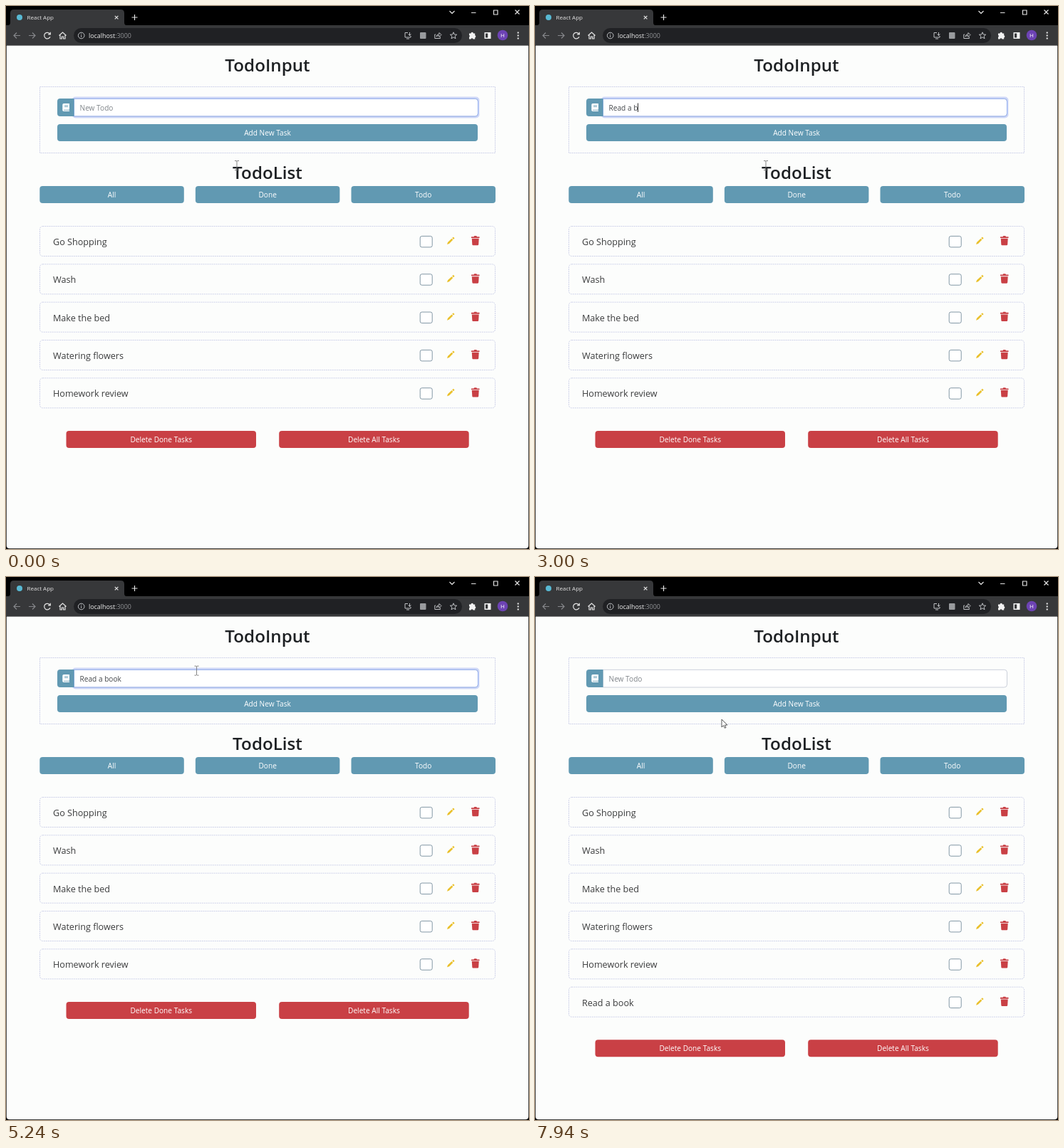
An HTML page that plays this animation: 734x763 px, repeating every 7.96 s.

```html
<!DOCTYPE html>
<html lang="en">
<head>
<meta charset="utf-8">
<title>Todo list</title>
<style>
html, body { margin: 0; width: 100%; height: 100%; overflow: hidden; background: #000; }
svg { display: block; width: 734px; height: 763px; font: 10.15px "Open Sans", "Noto Sans", sans-serif; }
text { white-space: pre; }
.mid { text-anchor: middle; }
.btn { fill: #fff; }
h1, .title { font-size: 24.2px; font-weight: 600; fill: #1d2023; }
.task { font-size: 12.6px; fill: #3b3c3d; }
.box { fill: none; stroke: #cdd1e9; stroke-dasharray: 2 1; }
.line { fill: none; stroke: #e4e4e4; stroke-width: 1.2; }
.dim { stroke: #85868a; }
.soft { stroke: #bfc1c4; stroke-width: 1; }
</style>
</head>
<body>
<svg viewBox="0 0 734 763">
  <rect width="734" height="763" fill="#000"/>
  <path d="M0 27H734V55H0Z" fill="#37383a"/>
  <path d="M3 27Q6 27 6 23V10Q6 5 11 5H161Q166 5 166 10V23Q166 27 169 27Z" fill="#37383a"/>
  <path d="M.7 55.5H733.3V758Q733.3 762.3 729 762.3H5Q.7 762.3 .7 758Z" fill="#fcfdfc"/>
  <rect x="95" y="31" width="545" height="21" rx="10.5" fill="#202124"/>

  <circle cx="19" cy="16" r="4" fill="#58b9d3"/>
  <text x="29.5" y="19" font-size="8" fill="#e6e6e6">React App</text>
  <text x="116" y="44.6" font-size="8.9" fill="#f1f1f1">localhost<tspan fill="#929497">:3000</tspan></text>

  <path class="line" d="M152.8 13.8l4.6 4.6m0-4.6l-4.6 4.6M180.5 12v8m-4-4h8"/>
  <path class="line" d="M622.5 7l3.5 3.5 3.5-3.5M653 9.5h6.5M684.5 6h5.5v6h-5.5zM714.5 5.5l6 6m0-6l-6 6"/>
  <path class="line dim" d="M20 41.5H11m4-4l-4 4 4 4M32 41.5h9m-4-4l4 4-4 4"/>
  <path class="line" stroke-width="1.4" d="M61.6 39.2a4.3 4.3 0 1 0 .4 4M62.3 36.8v3h-3.2"/>
  <path class="line" d="M74.5 41.5l5-4.5 5 4.5M76 41v5h2.4v-3h2.2v3H83v-5"/>
  <path class="line soft" d="M110 41.5a4.3 4.3 0 1 1-8.6 0a4.3 4.3 0 1 1 8.6 0M105.7 40.8v3M105.7 38.8v1"/>
  <path class="line soft" d="M564 37.5h-4v6.5h8v-2M562 46h4M566.5 37v4.5m-2-2l2 2 2-2"/>
  <rect x="581" y="37" width="8.5" height="9" rx="1" fill="#999b9e"/>
  <path class="line soft" d="M603 40h-1.2v5.5h7.6v-2M604 43q.5-3.5 4-3.5v-2l3 3-3 3v-2q-2.500-.2-4 1.500"/>
  <path class="line soft" d="M628 36.800l1.300 3.200 3.400.2-2.600 2.200.9 3.400-3-1.900-3 1.900.9-3.400-2.600-2.200 3.400-.2z"/>
  <path fill="#f2f2f2" d="M650 38.500h2.500a1.700 1.700 0 0 1 3.400 0h2.300v2.700a1.700 1.700 0 0 1 0 3.200v2H655.500a1.600 1.600 0 0 0-3 0H650v-2.700a1.500 1.500 0 0 0 0-2.700z"/>
  <path fill="#f2f2f2" fill-rule="evenodd" d="M671.500 37h9v9h-9zM673 38.500v6h3.200v-6z"/>
  <circle cx="697" cy="41" r="7.3" fill="#6d43b4"/>
  <text class="mid btn" x="697" y="44" font-size="8">H</text>
  <path fill="#eee" d="M717.700 36.500h2v2h-2zm0 4h2v2h-2zm0 4h2v2h-2z"/>

  <g id="page">
    <text class="mid title" x="367" y="92">TodoInput</text>
    <rect class="box" x="47.500" y="113.500" width="639" height="93"/>
    <rect id="ring" x="92.500" y="127.500" width="572" height="30" rx="5" fill="#cfd8f8"/>
    <path d="M95.500 130.300H658.500Q662.500 130.300 662.500 134V151Q662.500 155 658.500 155H95.500Z" fill="#fff" stroke="#cbcfda"/>
    <path id="focus" d="M95.500 130.300H658.500Q662.500 130.300 662.500 134V151Q662.500 155 658.500 155H95.500Z" fill="none" stroke="#93aff0"/>
    <path d="M95.500 130H76Q72 130 72 134V151Q72 155 76 155H95.500Z" fill="#6199b2"/>
    <path d="M81 137h8v8.500h-.7v1.500h.7v1H81q-1.700 0-1.700-1.700V138.700Q79.300 137 81 137z" fill="#fff"/>
    <path d="M82 139.700h5M82 141.500h5M81 146.300h7" stroke="#6199b2" stroke-width=".8"/>
    <text id="entry" x="103.500" y="146.700"></text>
    <path id="caret" d="M0 136.500V149" stroke="#333"/>
    <text class="mid title" x="367" y="243">TodoList</text>
  </g>
  <g id="list"></g>
  <g id="foot"></g>
  <g id="mouse"></g>
</svg>
<script>
const $ = id => document.getElementById(id);
const LOOP = 7960, ROW = 53.33, PRESS = 6070, ADD = 6180;
const BLUE = '#6199b2', RED = '#c94045';

const button = (x, y, w, label, color) =>
  `<rect x="${x}" y="${y}" width="${w}" height="24" rx="4" fill="${color}"/>
   <text class="mid btn" x="${x + w / 2}" y="${y + 16}">${label}</text>`;

const task = (label, i) => `<g transform="translate(0 ${i * ROW})">
  <rect class="box" x="47.5" y="309.5" width="639" height="42" rx="4"/>
  <text class="task" x="66" y="336">${label}</text>
  <rect x="581.2" y="323.4" width="17" height="15.5" rx="2.5" fill="#fff" stroke="#8297a5"/>
  <path transform="translate(619 324.5)" fill="#eac02c"
    d="M7.2 1.6L8.8 0 10.6 1.8 9 3.4ZM6.500 2.300L8.300 4.100 3 9.400 0 10.500 1 7.500Z"/>
  <path transform="translate(653 323)" fill="${RED}"
    d="M0 1.200H3.500L4.200 0H7.300L8 1.200H11.500V3H0ZM.8 3.800H10.700L10.200 12Q10.100 13.300 9 13.300H2.500Q1.400 13.300 1.300 12Z"/>
</g>`;

$('page').innerHTML += button(72, 166, 590, 'Add New Task', BLUE) +
  ['All', 'Done', 'Todo'].map((s, i) => button(47.3 + i * 218.6, 253, 202.5, s, BLUE)).join('');
$('list').innerHTML = ['Go Shopping', 'Wash', 'Make the bed', 'Watering flowers', 'Homework review', 'Read a book']
  .map(task).join('');
$('foot').innerHTML = button(84.5, 597, 266.5, 'Delete Done Tasks', RED) +
  button(383.2, 597, 266.5, 'Delete All Tasks', RED);

const pointers = {
  arrow: '<path d="M0 0V11L2.600 8.600 4.300 12.300 6 11.500 4.400 8H8Z" fill="#fff" stroke="#444" stroke-width=".9"/>',
  beam: '<path d="M-3-6.500h2.300l.7.700.7-.7H3M0-6V6M-3 6.500h2.300L0 5.800l.7.700H3" fill="none" stroke="#777" stroke-width=".9"/>',
  hand: '<path d="M-1.300 8.800V1Q-1.300-.4 0-.4T1.300 1V5Q3.600 4.300 3.800 5.700 5.900 5 6.100 6.500 8.300 6 8.300 8V10.500Q8.300 12.500 7 14.500H1Q-.5 12-2.600 9.500-3.800 7.300-1.300 8.800Z" fill="#fff" stroke="#333" stroke-width=".9"/>'
};

const phrase = 'Read a book';
const keys = [620, 820, 1000, 1200, 1700, 2000, 2400, 2850, 3150, 3350, 3620];
const route = [[0, 324, 224], [3850, 324, 224], [4400, 263, 65.500], [4750, 263, 68],
  [5650, 271, 180], [6300, 271, 180], [6900, 262, 198], [7200, 262, 198], [7700, 262, 200], [LOOP, 262, 200]];

function mouseAt(t) {
  const i = route.findIndex(p => p[0] > t);
  const [t0, x0, y0] = route[i - 1], [t1, x1, y1] = route[i];
  const u = (t - t0) / (t1 - t0), e = u * u * (3 - 2 * u);
  return [x0 + (x1 - x0) * e, y0 + (y1 - y0) * e];
}

function pointerFor(x, y) {
  const within = (l, r, top, bottom) => x > l && x < r && y > top && y < bottom;
  if (within(72, 662, 166, 190) || within(47, 687, 253, 277)) return 'hand';
  if (within(95, 662, 130, 155) || within(306, 428, 70, 100) || within(317, 416, 218, 250)) return 'beam';
  return 'arrow';
}

let shape = '';
function draw(t) {
  const added = t >= ADD, typed = keys.filter(k => k <= t).length;
  const entry = $('entry'), empty = added || !typed;
  entry.textContent = empty ? 'New Todo' : phrase.slice(0, typed);
  entry.setAttribute('fill', empty ? '#80858a' : '#45484c');

  const since = typed ? t - keys[typed - 1] : t + 530;
  const blink = t < PRESS && Math.floor(since / 530) % 2 === 0;
  const x = 103.5 + (typed ? entry.getComputedTextLength() : 0);
  $('caret').setAttribute('transform', `translate(${Math.floor(x) + .5})`);
  $('caret').setAttribute('opacity', +blink);

  const glow = 1 - Math.min(1, Math.max(0, (t - PRESS) / 150));
  $('ring').setAttribute('opacity', glow);
  $('focus').setAttribute('opacity', glow);
  $('list').lastElementChild.setAttribute('visibility', added ? 'visible' : 'hidden');
  $('foot').setAttribute('transform', `translate(0 ${added ? ROW : 0})`);

  const [mx, my] = mouseAt(t), next = pointerFor(mx, my);
  if (next !== shape) $('mouse').innerHTML = pointers[shape = next];
  $('mouse').setAttribute('transform', `translate(${mx} ${my})`);
}

const start = performance.now();
function tick() {
  draw((performance.now() - start) % LOOP);
  requestAnimationFrame(tick);
}
tick();
</script>
</body>
</html>
```
